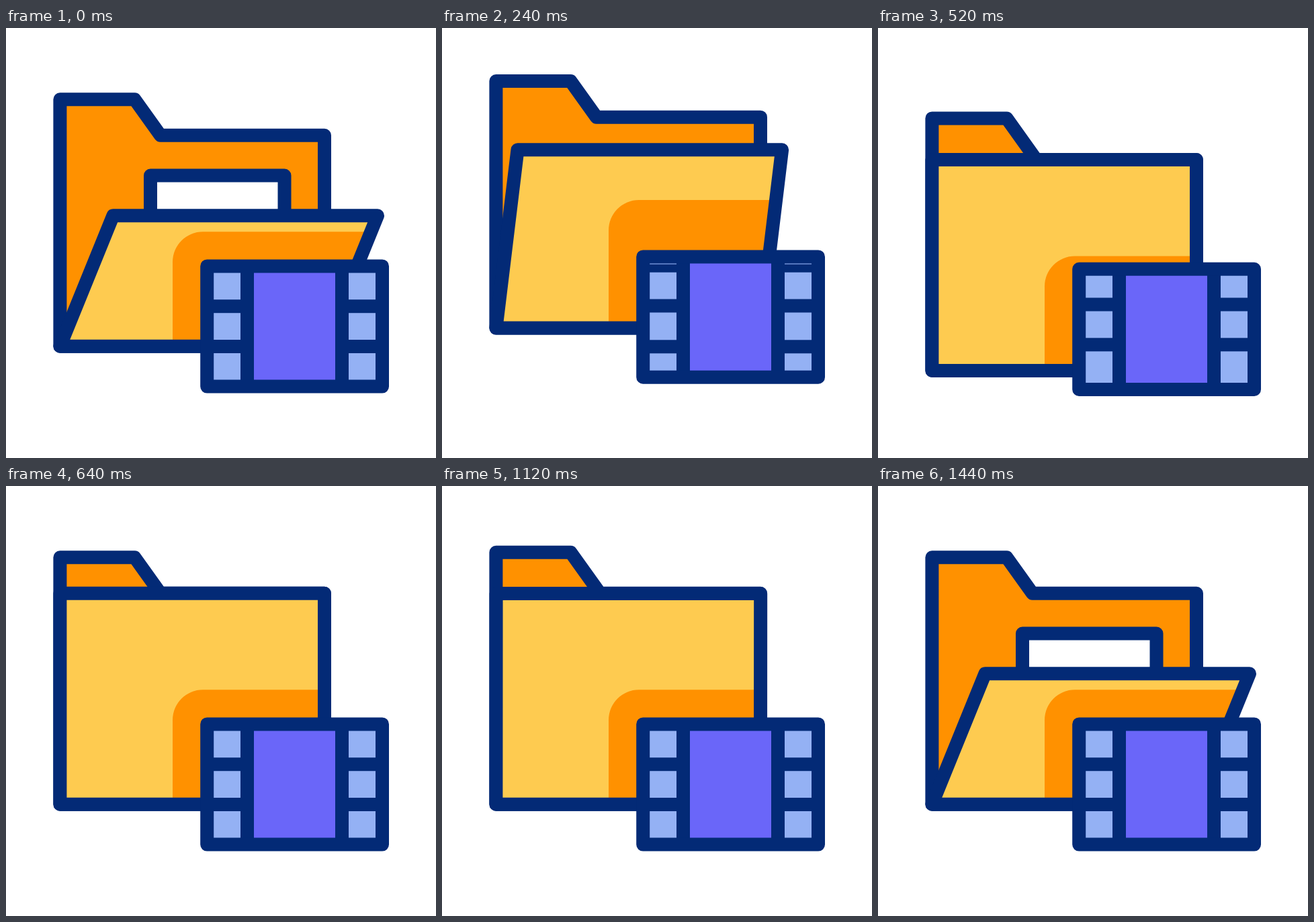
Write an HTML page with a canvas that moves like this. It is 640 by 640 pixels and loops after 1480 ms.

```html
<!DOCTYPE html>
<html lang="en">
<head>
<meta charset="utf-8">
<title>Video folder</title>
<style>
  html, body { margin: 0; width: 100%; height: 100%; overflow: hidden; background: #fff; }
  canvas { display: block; }
</style>
</head>
<body>
<canvas id="stage" width="640" height="640"></canvas>
<script>
const ctx = document.getElementById('stage').getContext('2d');
const LOOP = 1480, STEP = 40;
const NAVY = '#032a76', ORANGE = '#ff9100', YELLOW = '#fecb50';
const PURPLE = '#6a66f9', BLUE = '#94b1f4';
const LEFT = 80.4, RIGHT = 474, TOP = 159.8, BOTTOM = 473.7;

// Eases between [time, value] keys with a sine curve.
function track(t, ...keys) {
  if (t <= keys[0][0]) return keys[0][1];
  for (let i = 1; i < keys.length; i++) {
    const [t0, v0] = keys[i - 1], [t1, v1] = keys[i];
    if (t < t1) return v0 + (v1 - v0) * (1 - Math.cos(Math.PI * (t - t0) / (t1 - t0))) / 2;
  }
  return keys[keys.length - 1][1];
}

function polygon(points) {
  const path = new Path2D();
  points.forEach(([x, y]) => path.lineTo(x, y));
  path.closePath();
  return path;
}

function rect(color, x, y, w, h) {
  ctx.fillStyle = color;
  ctx.fillRect(x, y, w, h);
}

function outlined(path, color) {
  ctx.fillStyle = color;
  ctx.fill(path);
  ctx.stroke(path);
}

function drawBack(lift) {
  const tabTop = 106.2 - lift;
  const notch = 191.5 + (TOP - tabTop) * 0.715;
  outlined(polygon([
    [LEFT, tabTop], [191.5, tabTop], [notch, TOP],
    [RIGHT, TOP], [RIGHT, BOTTOM], [LEFT, BOTTOM]
  ]), ORANGE);
}

function drawFront(open, shadeShift) {
  const lean = 79 * open, top = TOP + 119.5 * open;
  const panel = polygon([
    [LEFT + lean, top], [RIGHT + lean, top], [RIGHT, BOTTOM], [LEFT, BOTTOM]
  ]);
  ctx.fillStyle = YELLOW;
  ctx.fill(panel);
  ctx.save();
  ctx.clip(panel);
  ctx.fillStyle = ORANGE;
  ctx.beginPath();
  ctx.roundRect(248, 303.3 + shadeShift, 400, 300, 45);
  ctx.fill();
  ctx.restore();
  ctx.stroke(panel);
}

function drawFilm(t) {
  rect(BLUE, 299, 354.4, 261, 179.2);
  for (let i = 0; i < 3; i++) {
    const slip = track(t, [40, 0], [180, 13.5], [360, i === 2 ? 16.5 : 12.5], [520, -7], [590, 0]);
    const y = 344.4 + i * 59.8 + slip;
    const top = Math.max(y, 365.6);
    rect(NAVY, 299, top, 261, Math.max(0, y + 20 - top));
  }
  rect(NAVY, 349, 354, 161, 179);
  rect(PURPLE, 369, 354, 121, 179);
  ctx.strokeRect(299.2, 354.4, 260.8, 179.2);
}

function draw(t) {
  const folderY = track(t, [120, 0], [270, -30], [490, 40], [640, 0]);
  const filmY = track(t, [40, 0], [180, -21.5], [410, 26], [560, 0]);
  const open = track(t, [100, 1], [350, 0], [1110, 0], [1440, 1]);
  const lift = track(t, [420, 0], [520, 8], [620, 0], [890, 0], [1040, 15], [1200, 0]);
  const shadeShift = track(t, [40, 0], [190, -23], [410, 0]);

  rect('#fff', 0, 0, 640, 640);
  ctx.strokeStyle = NAVY;
  ctx.lineWidth = 20;
  ctx.lineJoin = 'round';

  ctx.save();
  ctx.translate(0, folderY);
  drawBack(lift);
  outlined(polygon([[215, 219.5], [414.5, 219.5], [414.5, 310], [215, 310]]), '#fff');
  drawFront(open, shadeShift);
  ctx.restore();

  ctx.save();
  ctx.translate(0, filmY);
  drawFilm(t);
  ctx.restore();
}

function tick() {
  const t = performance.now() % LOOP;
  draw(Math.floor(t / STEP) * STEP);
  requestAnimationFrame(tick);
}
tick();
</script>
</body>
</html>
```
